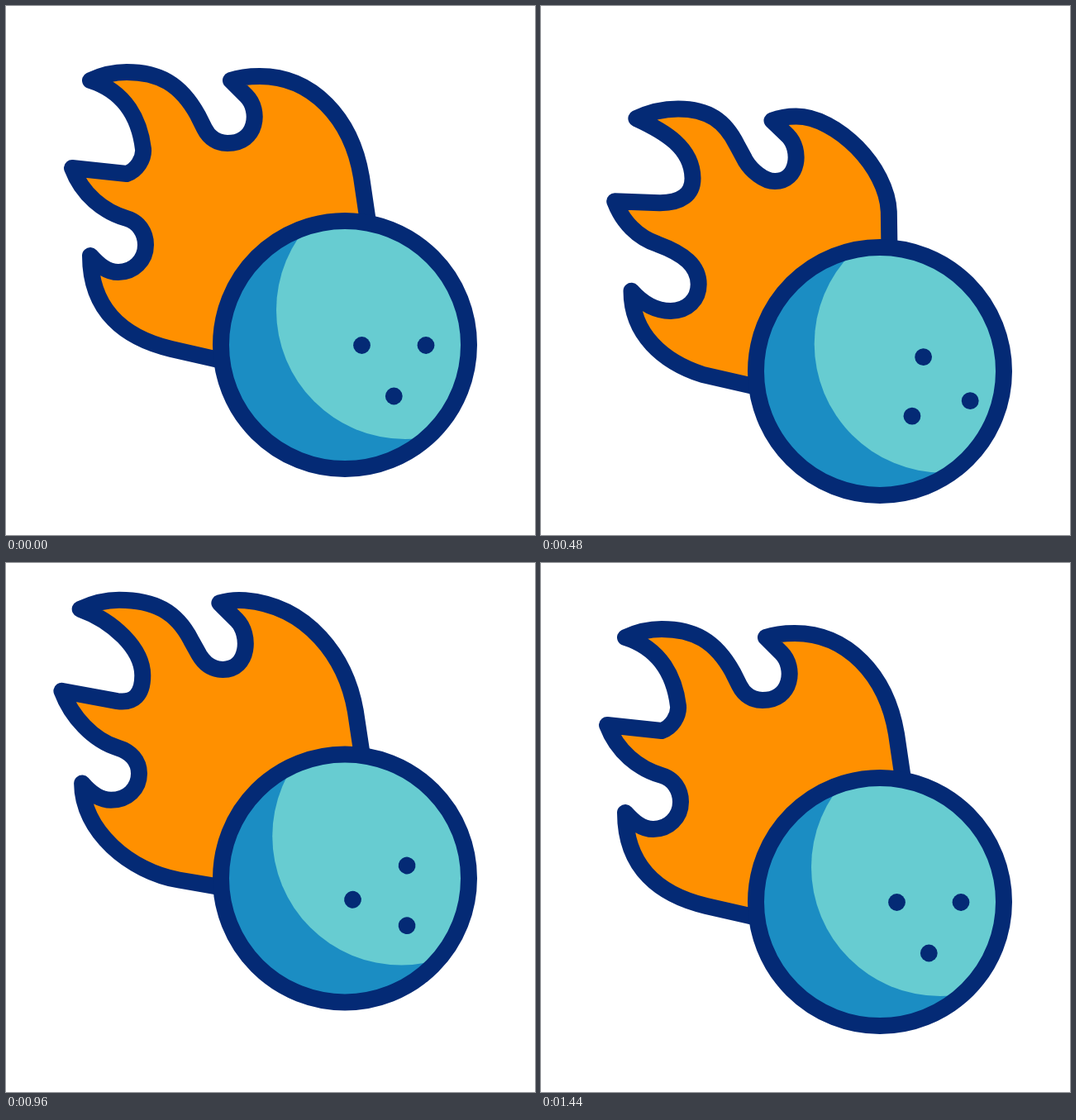
Recreate the animation shown at these times as an HTML page. Size 640 by 640 pixels, loop 1.48 s.

```html
<!DOCTYPE html>
<html lang="en">
<head>
<meta charset="utf-8">
<title>Flaming bowling ball</title>
<style>
  html, body { margin: 0; width: 100%; height: 100%; overflow: hidden; background: #fff; }
  svg { display: block; width: 100vw; height: 100vh; }
</style>
</head>
<body>
<svg viewBox="0 0 640 640">
  <defs>
    <clipPath id="disc"><circle cx="410" cy="410" r="150"/></clipPath>
  </defs>
  <g id="all">
    <path id="flame" fill="#ff9000" stroke="#042a75" stroke-width="20"
      stroke-linecap="round" stroke-linejoin="round"/>
    <circle cx="410" cy="410" r="150" fill="#1b8dc3"/>
    <g clip-path="url(#disc)"><circle id="light" r="156" fill="#67ccd1"/></g>
    <circle cx="410" cy="410" r="150" fill="none" stroke="#042a75" stroke-width="20"/>
    <g id="holes" fill="#042a75">
      <circle cx="430.5" cy="410.5" r="10.4"/>
      <circle cx="508" cy="410.5" r="10.4"/>
      <circle cx="469.3" cy="472" r="10.4"/>
    </g>
  </g>
</svg>
<script>
const LOOP = 1480, STEP = 40, END = 1440;
const $ = id => document.getElementById(id);
const all = $('all'), flame = $('flame'), light = $('light'), holes = $('holes');

// Three poses: at rest, lowest point, highest point
const POSES = [
  { dy: 0, turn: 0, lx: 483, ly: 368,
    d: 'M440 275 L430 207 C418 135 370 85 307 85 C294 85 283 86 272 90 L291 109 C308 126 304 166 268 166 ' +
       'C256 166 246 160 240 148 L232 132 C211 94 185 80 146 80 C130 80 115 84 102 90 C146 104 162 140 166 173 ' +
       'C167 185 158 199 146 203 L80 196 C92 228 118 249 146 257 C160 261 169 274 169 289 C169 308 154 322 136 322 ' +
       'C122 322 113 314 102 302 C102 370 145 402 200 415 L270 431' },
  { dy: 37, turn: 50, lx: 487.3, ly: 378.2,
    d: 'M418 275 L419 219 C419 169 355 105 309 105 C297 105 289 107 281 110 L300 128 C317 145 313 183 286 183 ' +
       'C272 183 256 168 249 157 L238 137 C225 110 206 95 170 95 C149 95 132 100 118 107 C150 123 187 139 187 177 ' +
       'C187 198 172 208 143 207 L91 206 C100 230 117 248 140 256 C175 269 195 284 195 308 C195 326 182 340 161 340 ' +
       'C142 340 125 331 111 315 C111 364 148 398 195 414 L270 431' },
  { dy: -32.5, turn: -37, lx: 477.7, ly: 358,
    d: 'M434 276 L423 207 C411 141 366 79 288 72 C276 71 267 72 257 75 L278 96 C295 113 293 156 261 156 ' +
       'C248 156 239 149 233 139 L223 121 C205 86 178 72 135 72 C118 72 103 76 88 83 C128 97 164 132 164 164 ' +
       'C164 187 154 198 134 195 L66 182 C78 214 105 243 135 252 C149 256 159 267 159 282 C159 300 145 314 125 314 ' +
       'C112 314 102 307 91 294 C91 352 150 402 210 412 L270 422' }
];
POSES.forEach(p => p.pts = p.d.match(/\d+/g).map(Number));

// Time, progress through the poses, speed
const RETURN = [[1014, 2, 0], [1120, 2.27, .0031], [END, 3, 0]];
const BALL = [[66, 0, 0], [606, 1, 0], [800, 1.48, .0035], [960, 1.944, .0021], ...RETURN];
const FLAME = [[80, 0, 0], [360, .51, .0028], [606, 1, 0], [800, 1.55, .0035], [960, 1.944, .0018], ...RETURN];

function progress(keys, t) {
  if (t <= keys[0][0] || t >= END) return 0;
  const i = keys.findIndex(k => t < k[0]);
  const [t0, v0, m0] = keys[i - 1], [t1, v1, m1] = keys[i];
  const T = t1 - t0, s = (t - t0) / T, q = 1 - s;
  return v0 + (v1 - v0) * s * s * (3 - 2 * s) + T * s * q * (m0 * q - m1 * s);
}

// Returns the two poses around the given time and a mixer between them
function blend(keys, t) {
  const p = progress(keys, t), i = Math.floor(p), f = p - i;
  return { a: POSES[i % 3], b: POSES[(i + 1) % 3], mix: (x, y) => x + (y - x) * f };
}

function draw(t) {
  const ball = blend(BALL, t), fire = blend(FLAME, t);
  const at = key => ball.mix(ball.a[key], ball.b[key]);
  let n = 0;
  flame.setAttribute('d', fire.a.d.replace(/\d+/g, () => {
    const v = fire.mix(fire.a.pts[n], fire.b.pts[n]).toFixed(2);
    n++;
    return v;
  }));
  all.setAttribute('transform', `translate(0 ${at('dy')})`);
  light.setAttribute('cx', at('lx'));
  light.setAttribute('cy', at('ly'));
  holes.setAttribute('transform', `rotate(${at('turn')} 469 442.3)`);
}

const start = performance.now();
function tick() {
  const t = (performance.now() - start) % LOOP;
  draw(Math.floor(t / STEP) * STEP);
  requestAnimationFrame(tick);
}
tick();
</script>
</body>
</html>
```
